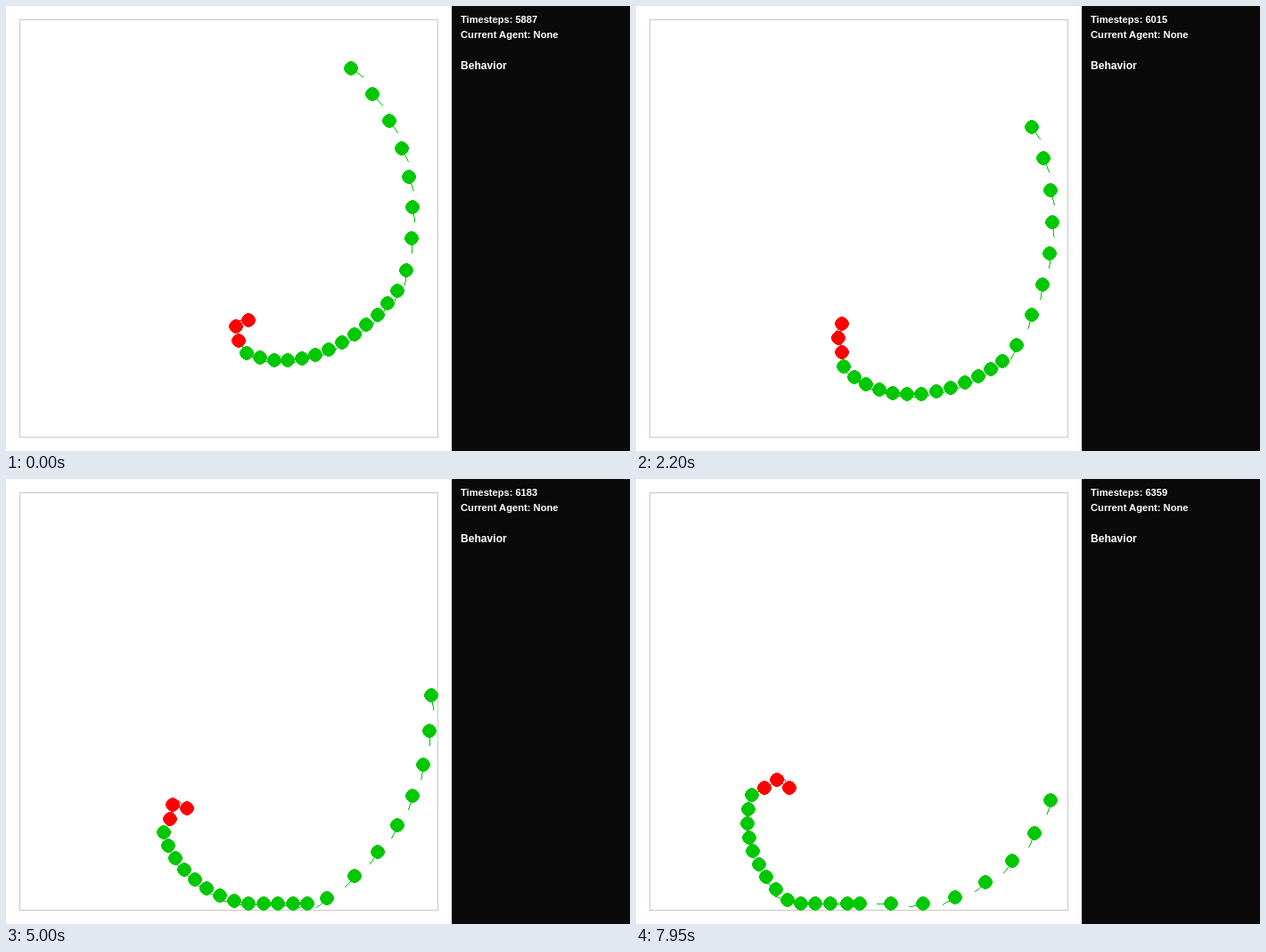
Write an HTML page with a canvas that moves like this. It is 700 by 500 pixels and loops after 8 s.

```html
<!DOCTYPE html>
<html lang="en">
<head>
<meta charset="utf-8">
<title>Swarm behavior</title>
<style>
  html, body { margin: 0; width: 100%; height: 100%; overflow: hidden; background: #fff; }
  canvas, svg { position: absolute; left: 0; top: 0; display: block; }
  text { font: bold 11.1px "Liberation Sans", Arial, sans-serif; fill: #fff; }
  .agent { font-size: 11.2px; }
  .title { font-size: 12.1px; }
</style>
</head>
<body>
<canvas id="stage" width="700" height="500"></canvas>
<svg width="700" height="500">
  <text x="510" y="19">Timesteps: <tspan id="count">5887</tspan></text>
  <text class="agent" x="510" y="36">Current Agent: None</text>
  <text class="title" x="510" y="71">Behavior</text>
</svg>
<script>
const LOOP = 8000, STEP = 400 / 3, FIRST = 200, TICK = 50;
const GREEN = '#00c800', RED = '#ff0000';
const RADIUS = 8, FLOOR = 477, AGENTS = 24, LAST_GREEN = 20, GAP = 16.5;

// Two bicubic patches over agent index and time: the loose head and the packed tail.
// Each row is one pose, x, y per knot; y may pass the floor and is clamped later.
const TIMES = [0, 16, 37, 59];
const HEAD = {
  knots: [0, 2, 5, 7],
  poses: [
    [387, 70, 430, 129, 456, 226, 449, 297],
    [444, 136, 465, 207, 456, 313, 427, 381],
    [477, 243, 468, 321, 417, 419, 360, 471],
    [465, 361, 422, 429, 322, 482, 251, 488]
  ]
};
const TAIL = {
  knots: [8, 12, 16, 20],
  poses: [
    [439, 320, 391, 369, 332, 396, 270, 390],
    [411, 399, 353, 429, 288, 435, 233, 405],
    [338, 481, 272, 479, 212, 450, 177, 397],
    [237, 510, 170, 473, 131, 418, 130, 355]
  ]
};
// The red agents hang on the chain at these bearings: [step, degrees from north].
const BEARINGS = [
  [[0, -33], [59, 60]],
  [[0, -12], [24, -16], [37, 11], [49, 60], [59, 58]],
  [[0, 63], [12, 15], [23, 15], [37, 104], [49, 195], [59, 123]]
];

const ctx = document.getElementById('stage').getContext('2d');
const count = document.getElementById('count');

// Polynomial through the points (xs[k], ys[k])
function fit(xs, ys, x) {
  return xs.reduce((sum, a, k) => {
    let w = ys[k];
    xs.forEach((b, j) => { if (j !== k) w *= (x - b) / (a - b); });
    return sum + w;
  }, 0);
}

function lerpKeys(keys, n) {
  const k = Math.max(1, keys.findIndex(key => key[0] >= n));
  const [n0, v0] = keys[k - 1], [n1, v1] = keys[k];
  return v0 + (v1 - v0) * (n - n0) / (n1 - n0);
}

function onPatch(i, n) {
  const { knots, poses } = i < TAIL.knots[0] ? HEAD : TAIL;
  return [0, 1].map(c =>
    fit(TIMES, poses.map(p => fit(knots, p.filter((_, k) => k % 2 === c), i)), n));
}

function chainAt(n) {
  const pts = [];
  for (let i = 0; i <= LAST_GREEN; i++) {
    const [x, y] = onPatch(i, n);
    pts.push([x, Math.min(y, FLOOR)]);
  }
  for (const keys of BEARINGS) {
    const [x, y] = pts[pts.length - 1], a = lerpKeys(keys, n) * Math.PI / 180;
    pts.push([x + GAP * Math.sin(a), y - GAP * Math.cos(a)]);
  }
  return pts;
}

function angle(a, b) {
  return Math.atan2(b[1] - a[1], b[0] - a[0]);
}

// Along the chain, leaning towards the agent's own motion near the head
function heading(i, n, pts) {
  if (i === AGENTS - 1) return angle(pts[i], pts[i - 1]) + 0.45;
  if (i >= LAST_GREEN) return angle(pts[i], pts[i + 1]);
  const v = angle(onPatch(i, n - 4), onPatch(i, n));
  if (i === 0) return v;
  const c = angle(pts[i - 1], pts[i]);
  const lean = 0.8 * (1 - (i / LAST_GREEN) ** 2);
  return Math.atan2(Math.sin(c) + lean * Math.sin(v), Math.cos(c) + lean * Math.cos(v));
}

// Hard-edged shapes, one pixel row or dot at a time
function disc(x, y) {
  for (let r = -RADIUS; r < RADIUS; r++) {
    const w = Math.round(Math.sqrt((RADIUS - 0.3) ** 2 - (r + 0.5) ** 2));
    ctx.fillRect(x - w, y + r, 2 * w, 1);
  }
}

function ray(x, y, a) {
  const dx = 2 * RADIUS * Math.cos(a), dy = 2 * RADIUS * Math.sin(a);
  const len = Math.round(Math.max(Math.abs(dx), Math.abs(dy)));
  for (let k = 0; k <= len; k++) {
    ctx.fillRect(Math.round(x + dx * k / len), Math.round(y + dy * k / len), 1, 1);
  }
}

function draw(n) {
  ctx.fillStyle = '#fff';
  ctx.fillRect(0, 0, 500, 500);
  ctx.fillStyle = '#0a0a0a';
  ctx.fillRect(500, 0, 200, 500);
  ctx.strokeStyle = '#c8c8c8';
  ctx.strokeRect(15.5, 15.5, 469, 469);

  const pts = chainAt(n);
  pts.forEach((p, i) => {
    const x = Math.round(p[0]), y = Math.round(p[1]);
    ctx.fillStyle = i > LAST_GREEN ? RED : GREEN;
    disc(x, y);
    ray(x, y, heading(i, n, pts));
  });
  count.textContent = 5887 + 8 * n;
}

function stepAt(t) {
  let n = 0;
  while (Math.round((FIRST + n * STEP) / TICK) * TICK <= t) n++;
  return n;
}

const start = performance.now();
let shown = -1;
function tick() {
  const n = stepAt((performance.now() - start) % LOOP);
  if (n !== shown) draw(shown = n);
  requestAnimationFrame(tick);
}
tick();
</script>
</body>
</html>
```
